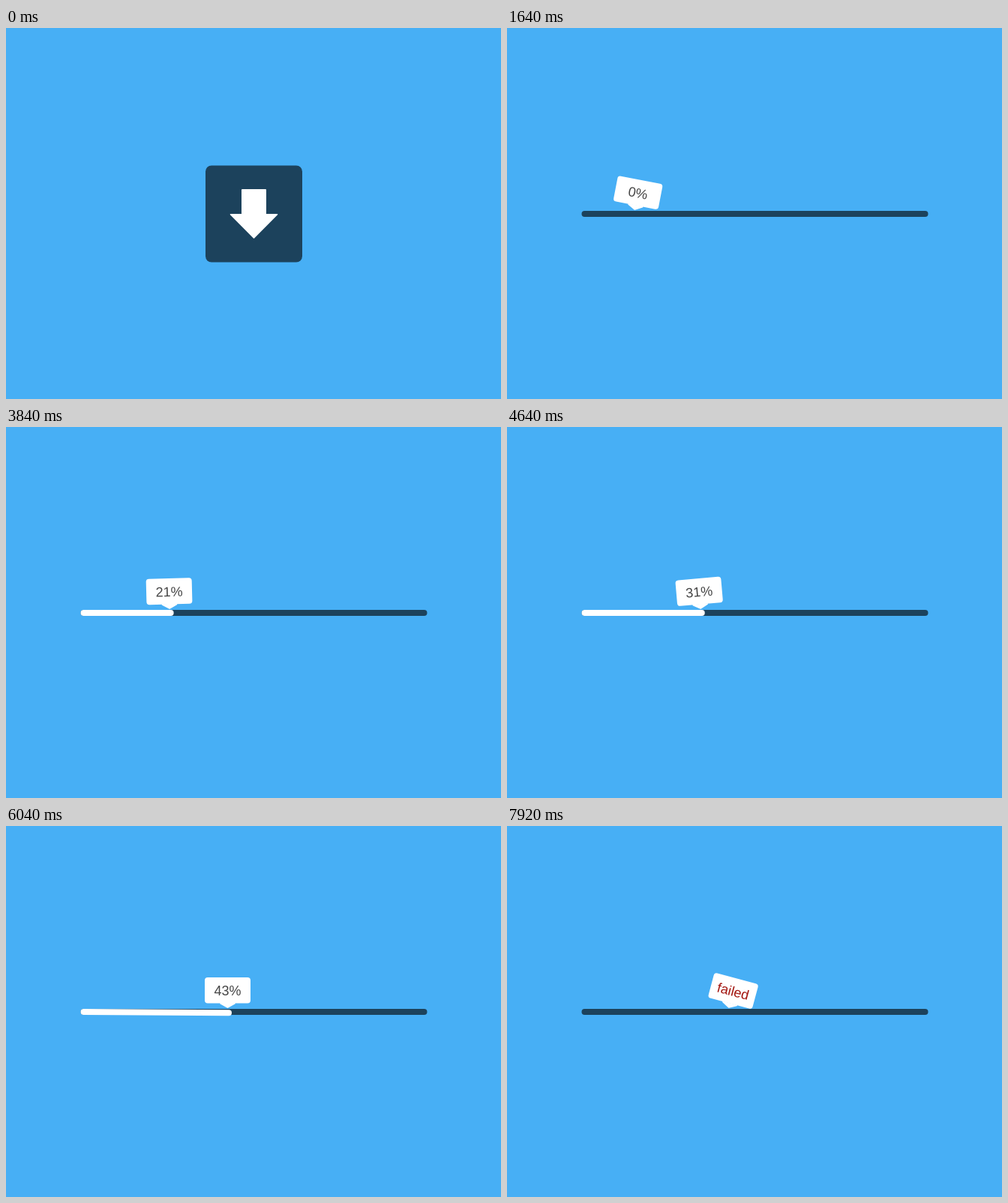
An HTML page with a canvas that plays this animation: 660x495 px, repeating every 8 s.

```html
<!DOCTYPE html>
<html lang="en">
<head>
<meta charset="utf-8">
<title>Download progress</title>
<style>
  html, body { margin: 0; width: 100%; height: 100%; overflow: hidden; background: #47aff5; }
  canvas { display: block; }
</style>
</head>
<body>
<canvas id="stage" width="660" height="495"></canvas>
<script>
const ctx = document.getElementById("stage").getContext("2d");
const LOOP = 8000, STEP = 40;
const MID_X = 330.5, BAR_Y = 248, BAR_LEFT = 99.5, TIP_Y = 243;
const COLORS = { sky: "#47aff5", bar: "#1c425c", text: "#444444", error: "#a3150f" };

// Each slide tilts the bubble against its travel, then lets it swing past upright.
const SLIDES = [
  { start: 1290, end: 1840, from: MID_X, to: 104, lean: 12, swing: -10, settle: 320 },
  { start: 2400, end: 2860, from: 104, to: 203, lean: -4, swing: 9, settle: 220 },
  { start: 3500, end: 3960, from: 203, to: 221, lean: -2, swing: 2, settle: 400 },
  { start: 4380, end: 4900, from: 221, to: 295.5, lean: -5, swing: 10, settle: 260 }
];
const COUNTS = [[2400, 0], [2640, 12.3], [2860, 20], [3520, 20], [3840, 21.4],
                [4380, 24], [4640, 31.4], [4900, 43]];

const clamp = v => Math.min(1, Math.max(0, v));
const span = (t, a, b) => clamp((t - a) / (b - a));
const lerp = (a, b, u) => a + (b - a) * u;
const smooth = u => 0.5 - 0.5 * Math.cos(Math.PI * u);
const rad = deg => deg * Math.PI / 180;

function roundBox(x, y, w, h, r, color) {
  ctx.fillStyle = color;
  ctx.beginPath();
  ctx.roundRect(x, y, w, h, r);
  ctx.fill();
}

function bubblePose(t) {
  let x = MID_X, tilt = 0;
  for (const s of SLIDES) {
    if (t < s.start) break;
    const u = span(t, s.start, s.end);
    x = lerp(s.from, s.to, smooth(u));
    tilt = u < 1
      ? s.lean * Math.sin(Math.PI * u)
      : s.swing * Math.sin(Math.PI * span(t, s.end, s.end + s.settle));
  }
  const fail = span(t, 6840, 7240);
  return { x, tilt: tilt + 15 * (1 - (1 - fail) ** 3) };
}

function countAt(t) {
  let value = 0;
  for (let i = 1; i < COUNTS.length; i++) {
    const [t0, a] = COUNTS[i - 1], [t1, b] = COUNTS[i];
    if (t >= t0) value = lerp(a, b, span(t, t0, t1));
  }
  return Math.floor(value);
}

function drawTrack(t, morph) {
  const settle = smooth(span(t, 1380, 1520));
  const w = lerp(129, 497, morph) - 35 * settle;
  const h = lerp(129, 8, morph);
  roundBox(MID_X - w / 2, BAR_Y - h / 2, w, h, lerp(8, 4, morph), COLORS.bar);
}

function drawFill(t, tipX) {
  if (t <= 2400) return;
  const drop = 250 * Math.max(0, (t - 6420) / 800) ** 2;
  if (drop > 250) return;
  ctx.save();
  ctx.translate(BAR_LEFT + 4, BAR_Y + drop);
  ctx.rotate(rad(88 * span(t, 6000, 6650) ** 2));
  roundBox(-4, -4, tipX + 5.5 - BAR_LEFT, 8, 4, "#fff");
  ctx.restore();
}

// Arrow at morph 0, speech bubble at morph 1; the origin is its point.
function drawPointer(t, morph, pose) {
  const w = lerp(33, 61, morph), h = lerp(33, 34, morph);
  const head = lerp(65, 22, morph), depth = lerp(33, 7, morph);
  const hop = 53 * Math.sin(Math.PI * span(t, 720, 1380));

  ctx.save();
  ctx.translate(pose.x, lerp(281, TIP_Y, morph) - hop);
  ctx.rotate(rad(pose.tilt));
  roundBox(-w / 2, -depth - h, w, h + 0.5, lerp(1, 4, morph), "#fff");
  ctx.beginPath();
  ctx.moveTo(-head / 2 + 1.5, -depth + 0.8);
  ctx.lineTo(head / 2 - 1.5, -depth + 0.8);
  ctx.lineTo(0, -1);
  ctx.closePath();
  ctx.fill();
  ctx.strokeStyle = "#fff";
  ctx.lineWidth = 1.6;
  ctx.lineJoin = "round";
  ctx.stroke();

  const failed = t >= 6880;
  ctx.globalAlpha = span(t, 1380, 1540);
  ctx.fillStyle = failed ? COLORS.error : COLORS.text;
  ctx.font = '18px "Liberation Sans", Arial, sans-serif';
  ctx.textAlign = "center";
  ctx.fillText(failed ? "failed" : countAt(t) + "%", 0, -17);
  ctx.restore();
}

function draw(now) {
  const t = Math.floor((now % LOOP) / STEP) * STEP;
  const morph = smooth(span(t, 720, 1380));
  const pose = bubblePose(t);
  ctx.fillStyle = COLORS.sky;
  ctx.fillRect(0, 0, 660, 495);
  drawTrack(t, morph);
  drawFill(t, pose.x);
  drawPointer(t, morph, pose);
}

const begin = performance.now();
function tick() {
  draw(performance.now() - begin);
  requestAnimationFrame(tick);
}
tick();
</script>
</body>
</html>
```
